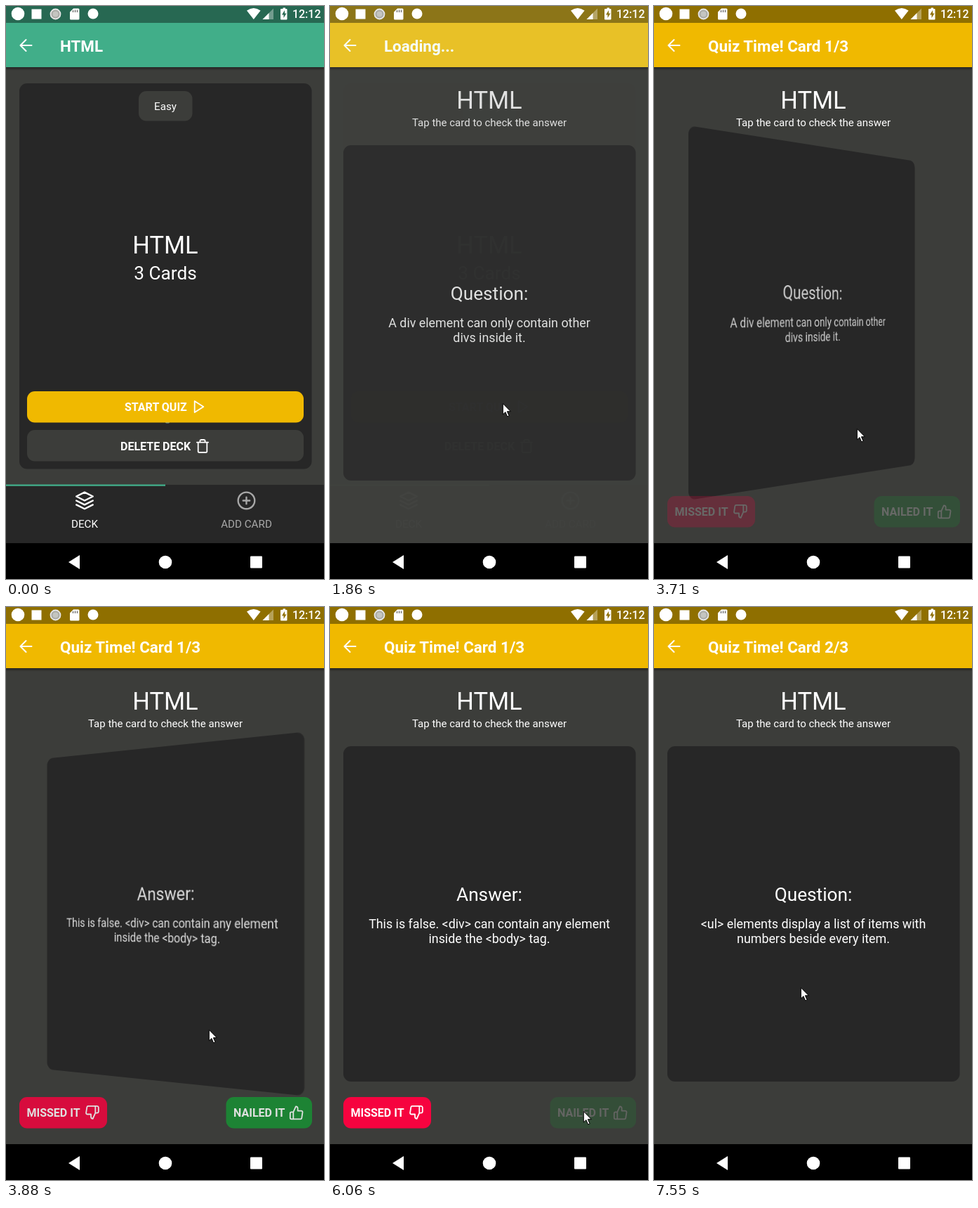
Animation, 453 px wide and 815 px high, one loop 8000 ms. Source, as an HTML page:

```html
<!DOCTYPE html>
<html lang="en">
<head>
<meta charset="utf-8">
<title>Flashcard quiz</title>
<style>
  html, body { margin: 0; width: 100%; height: 100%; overflow: hidden; background: #000; }
  #stage { position: relative; width: 453px; height: 815px; overflow: hidden; }
  #stage > *, #quiz > * { position: absolute; left: 0; top: 0; }
  svg { display: block; overflow: visible; font-family: Roboto, sans-serif; fill: #fff; }
  #quiz .face { left: 19px; top: 197.5px; transform-origin: 208.25px 238.5px; }
  .mid { text-anchor: middle; }
  .bold { font-weight: 700; font-size: 16px; }
  .title { font-weight: 700; font-size: 22.4px; }
  .name { font-size: 34.5px; }
  .big { font-size: 26.2px; }
  .body { font-size: 17.85px; }
  .small { font-size: 15.2px; }
  .line { fill: none; stroke: #fff; stroke-width: 2; stroke-linecap: round; stroke-linejoin: round; }
</style>
</head>
<body>
<div id="stage">
  <svg width="453" height="815">
    <defs>
      <linearGradient id="shade" x2="0" y2="1">
        <stop offset="0" stop-opacity=".4"/><stop offset="1" stop-opacity="0"/>
      </linearGradient>
      <path id="back" class="line" stroke-linecap="butt" d="M36.5 56H21M28.5 48l-8 8 8 8"/>
    </defs>
    <rect width="453" height="764" fill="#505250"/>
    <rect width="453" height="87" fill="#d3f5f8"/>
    <rect width="453" height="24" fill="#8c9c98"/>
    <g id="deck">
      <rect width="453" height="764" fill="#3c3d3a"/>
      <rect width="453" height="87" fill="#41ae89"/>
      <rect width="453" height="24" fill="#276852"/>
      <rect y="87" width="453" height="5" fill="url(#shade)"/>
      <use href="#back"/>
      <text class="title" x="77" y="65">HTML</text>
      <rect x="19" y="110" width="416.5" height="548.5" rx="11" fill="#272727"/>
      <rect x="189" y="121" width="76.5" height="42.5" rx="11" fill="#3c3d3a"/>
      <text class="small mid" x="227" y="148">Easy</text>
      <text class="name mid" x="227" y="352">HTML</text>
      <text class="big mid" x="227" y="389">3 Cards</text>
      <ellipse id="speck" cx="230" cy="592" rx="3" ry="1.6" fill="#6d93a5"/>
      <g id="start">
        <rect x="30" y="548" width="394" height="44.5" rx="11" fill="#f0b900"/>
        <text class="bold" x="169" y="576">START QUIZ</text>
        <path class="line" transform="translate(264.2 559.2) scale(.9)" d="M5 3l14 9-14 9z"/>
      </g>
      <rect x="30" y="603" width="394" height="44.5" rx="11" fill="#3c3d3a"/>
      <text class="bold" x="163" y="632">DELETE DECK</text>
      <path class="line" transform="translate(269.2 615.2) scale(.9)" d="M3 6h18M19 6v14a2 2 0 0 1-2 2H7a2 2 0 0 1-2-2V6m3 0V4a2 2 0 0 1 2-2h4a2 2 0 0 1 2 2v2"/>
      <rect y="681" width="453" height="83" fill="#272727"/>
      <rect y="680.5" width="227" height="2.3" fill="#41ae89"/>
      <path class="line" transform="translate(97.8 689.3) scale(1.18)" d="M12 2L2 7l10 5 10-5zM2 17l10 5 10-5M2 12l10 5 10-5"/>
      <text class="small mid" x="112" y="742">DECK</text>
      <g opacity=".6">
        <path class="line" transform="translate(328.3 689.3) scale(1.18)" d="M12 2a10 10 0 0 1 0 20a10 10 0 0 1 0-20M12 8v8M8 12h8"/>
        <text class="small mid" x="342.5" y="742">ADD CARD</text>
      </g>
    </g>
  </svg>

  <div id="quiz">
    <svg width="453" height="815">
      <rect width="453" height="764" fill="#3c3d3a"/>
      <rect width="453" height="87" fill="#f0b900"/>
      <rect width="453" height="24" fill="#8f6f00"/>
      <rect y="87" width="453" height="5" fill="url(#shade)"/>
      <use href="#back"/>
      <text id="title" class="title" x="77" y="65"></text>
      <text class="name mid" x="227" y="146">HTML</text>
      <text class="mid" font-size="15" x="227" y="171">Tap the card to check the answer</text>
    </svg>
    <svg id="question" class="face" width="416.5" height="477">
      <rect width="416.5" height="477" rx="11" fill="#272727"/>
      <g class="mid">
        <text class="big" x="208" y="219.5">Question:</text>
        <text class="body" x="208" y="258.5"></text>
        <text class="body" x="208" y="279.5"></text>
      </g>
    </svg>
    <svg id="answer" class="face" width="416.5" height="477">
      <rect width="416.5" height="477" rx="11" fill="#272727"/>
      <g class="mid">
        <text class="big" x="208" y="219.5">Answer:</text>
        <text class="body" x="208" y="258.5">This is false. &lt;div&gt; can contain any element</text>
        <text class="body" x="208" y="279.5">inside the &lt;body&gt; tag.</text>
      </g>
    </svg>
    <svg width="453" height="815">
      <g id="missed">
        <rect x="19" y="697" width="125" height="44.5" rx="11" fill="#f6033f"/>
        <text class="bold" x="29.5" y="725">MISSED IT</text>
        <path class="line" transform="translate(112 708) scale(.9)" d="M10 15v4a3 3 0 0 0 3 3l4-9V2H5.72a2 2 0 0 0-2 1.7l-1.38 9a2 2 0 0 0 2 2.3zm7-13h2.67A2.31 2.31 0 0 1 22 4v7a2.31 2.31 0 0 1-2.33 2H17"/>
      </g>
      <g id="nailed">
        <rect x="313.5" y="697" width="122.5" height="44.5" rx="11" fill="#189134"/>
        <text class="bold" x="324" y="725">NAILED IT</text>
        <path class="line" transform="translate(403 708.5) scale(.9)" d="M14 9V5a3 3 0 0 0-3-3l-4 9v11h11.28a2 2 0 0 0 2-1.7l1.38-9a2 2 0 0 0-2-2.3zM7 22H4a2 2 0 0 1-2-2v-7a2 2 0 0 1 2-2h3"/>
      </g>
    </svg>
  </div>

  <svg width="453" height="815">
    <circle cx="17" cy="11" r="9.3"/>
    <rect x="36.5" y="4.5" width="14" height="14"/>
    <circle cx="70.5" cy="11.5" r="7" fill="#a9aaa5" stroke="#e6e6e6" stroke-width="1.8"/>
    <circle cx="70.5" cy="11.5" r="4" fill="#c4c5c0"/>
    <path d="M96 3.5h7a1.5 1.5 0 0 1 1.5 1.5v13a1.5 1.5 0 0 1-1.5 1.5H92.500a1.500 1.500 0 0 1-1.500-1.500V8.500z"/>
    <path d="M95.500 6v3M98.500 5.500V9M101.500 5.500V9" stroke="#666" stroke-width="1.3"/>
    <circle cx="124" cy="11" r="7.500"/>
    <path d="M343 6.500q9.800-7 19.600 0L352.800 19z"/>
    <path d="M381 3.500V19h-15.500z" opacity=".35"/>
    <path d="M374.500 10v9h-9z"/>
    <path fill-rule="evenodd" d="M393.500 4h1V2.500h3.500V4h1.500q1 0 1 1v13.500q0 1-1 1h-7.500q-1 0-1-1V5q0-1 1-1zM397 6l-4 6.500h2.500V17l4-6.500H397z"/>
    <text x="448.500" y="17" font-size="16" font-weight="500" text-anchor="end">12:12</text>
    <rect y="764" width="453" height="51" fill="#000"/>
    <path d="M89 791l16-10v20z"/>
    <circle cx="227" cy="791" r="9.300"/>
    <rect x="348" y="782.500" width="17" height="17" rx="1"/>
    <path id="cursor" d="M.3.500V16l3.600-3.400 2.700 6.300 2.500-1-2.700-6.200h4.900z" stroke="#000" stroke-width="1"/>
  </svg>
</div>

<script>
const LOOP = 8000;
const $ = id => document.getElementById(id);
const questionLines = $('question').querySelectorAll('.body');

// start, end, steps, from, control, to
const moves = [
  [140, 550, 6, [297, 754], [208, 615], [246, 565]],
  [2480, 3180, 10, [246, 565], [269, 631], [289, 601]],
  [5200, 5680, 7, [289, 601], [318, 676], [360, 728]],
  [5830, 6060, 4, [360, 728], [361, 722], [361, 717]],
  [7080, 7550, 7, [361, 717], [285, 625], [209, 541]]
];
const turn = [40, 109, 151, 168, 175, 178.5, 180];

// Index of the current step, -1 before the first one
function stepAt(t, start, end, count) {
  if (t < start) return -1;
  return Math.min(count - 1, Math.floor((t - start) / (end - start) * (count - 1) + 0.15));
}

function pick(values, k, before) {
  return k < 0 ? before : values[k];
}

function bezier(a, b, c, u) {
  return a.map((v, i) => (1 - u) ** 2 * v + 2 * u * (1 - u) * b[i] + u * u * c[i]);
}

function cursorAt(t) {
  const move = moves.filter(m => t >= m[0]).pop();
  if (!move) return null;
  const [start, end, count, from, control, to] = move;
  return bezier(from, control, to, stepAt(t, start, end, count) / (count - 1));
}

function setFace(face, angle, visible, strength) {
  face.style.visibility = visible ? 'visible' : 'hidden';
  face.style.transform = angle ? `perspective(1273px) rotateY(${angle}deg)` : 'none';
  face.querySelector('g').style.opacity = strength;
}

function setLines(lines) {
  lines.forEach((line, i) => {
    if (questionLines[i].textContent !== line) questionLines[i].textContent = line;
  });
}

function render(t) {
  const enter = stepAt(t, 1780, 2180, 6);
  $('deck').style.opacity = pick([.5, .1, 0, 0, 0, 0], enter, 1);
  $('quiz').style.opacity = pick([.45, .83, .93, .97, .99, 1], enter, 0);
  $('start').style.opacity = t < 1400 ? 1 : .5;
  $('speck').style.opacity = t < 1400 ? 1 : 0;

  const second = t >= 6380;
  $('title').textContent = t < 2480 ? 'Loading...' : `Quiz Time! Card ${second ? 2 : 1}/3`;
  setLines(second
    ? ['<ul> elements display a list of items with', 'numbers beside every item.']
    : ['A div element can only contain other', 'divs inside it.']);

  const flip = second
    ? 180 - pick([40, 109, 156.5, 170, 176, 179, 180], stepAt(t, 6380, 6840, 7), 0)
    : pick(turn, stepAt(t, 3710, 4190, 7), 0);
  const shown = flip / 180;
  setFace($('question'), flip, flip < 90, 1 - shown);
  setFace($('answer'), flip - 180, flip >= 90, shown);

  $('missed').style.opacity = shown;
  $('nailed').style.opacity = shown * pick([.75, .4, .2, .2], stepAt(t, 5830, 6060, 4), 1);

  const spot = cursorAt(t);
  $('cursor').style.display = spot ? '' : 'none';
  if (spot) $('cursor').setAttribute('transform', `translate(${spot.map(Math.round)})`);
}

const began = performance.now();
function tick() {
  render((performance.now() - began) % LOOP);
  requestAnimationFrame(tick);
}
tick();
</script>
</body>
</html>
```
